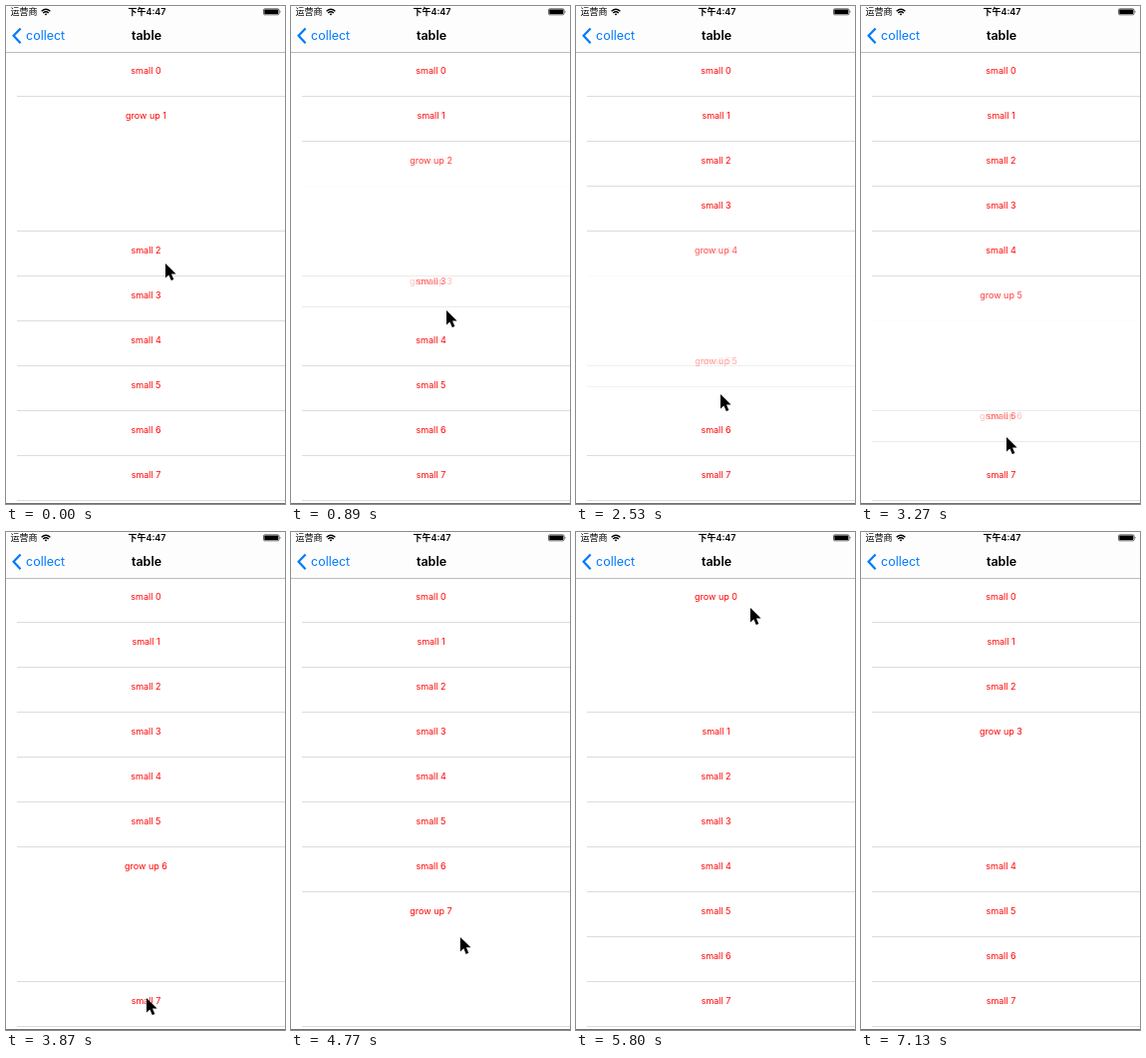
These frames come from a looping animation (280 by 499 pixels, 7570 ms). An HTML page:

```html
<!DOCTYPE html>
<html lang="zh">
<head>
<meta charset="utf-8">
<title>table</title>
<style>
  html, body { margin: 0; width: 100%; height: 100%; overflow: hidden; background: #fff; }
  svg { display: block; width: 100%; height: 100%; }
  text { font-family: Inter, "Noto Sans CJK SC", "Noto Sans CJK", sans-serif; }
  .label { font-size: 9px; fill: #f00; text-anchor: middle; }
  .status { font-size: 9px; }
  .bar { font-size: 12.5px; }
  .mid { text-anchor: middle; font-weight: 600; }
</style>
</head>
<body>
<svg viewBox="0 0 280 499" xmlns="http://www.w3.org/2000/svg">
  <rect width="280" height="499" fill="#fff"/>
  <g id="list"></g>
  <g id="nav">
    <rect width="280" height="46" fill="#fdfdfd"/>
    <rect y="46" width="280" height="1" fill="#bdbdbf"/>
    <text class="status" x="4.5" y="9">运营商</text>
    <g fill="none" stroke="#000" stroke-width="1.3">
      <path d="M35.6 5.2Q40 1.2 44.4 5.2"/>
      <path d="M37.2 7Q40 4.5 42.8 7"/>
    </g>
    <path d="M38.6 8L40 9.5L41.4 8Q40 6.8 38.6 8Z"/>
    <text class="status mid" x="141.5" y="9">下午4:47</text>
    <rect x="258.5" y="2.8" width="15.5" height="6" rx="1.2" fill="none" stroke="#000" stroke-width=".6"/>
    <rect x="259.3" y="3.6" width="13.9" height="4.4" rx=".6"/>
    <path d="M274.8 4.6Q276.2 5.8 274.8 7Z"/>
    <path d="M14.6 22.4L7.6 29.8L14.6 37.2" fill="none" stroke="#007aff" stroke-width="2.2"/>
    <text class="bar" x="20" y="34" fill="#007aff">collect</text>
    <text class="bar mid" x="141" y="34">table</text>
  </g>
  <rect y="498" width="280" height="1" fill="#707070"/>
  <path id="cursor" d="M0 0V14.6L3.4 11.4L5.8 17L8.4 15.9L6 10.4H10.6Z" fill="#000" stroke="#fff" stroke-width="1" paint-order="stroke"/>
</svg>
<script>
const NS = 'http://www.w3.org/2000/svg';
const LOOP = 7570, STEP = 148.6, LEAD = 9;
const ROWS = 8, TOP = 46, SMALL = 45, TALL = 135, FADE = 2;

const taps = [[-9, 1], [0.5, 2], [5.5, 3], [11.5, 4], [16.32, 5],
              [21.5, 6], [27.5, 7], [36.88, 0], [43.5, 3]];
const moves = [ // start, end, x, y, sideways bow
  [2, 4, 156, 305, 0], [8, 10, 148, 338, 0], [13, 15, 145, 389, 0],
  [19, 21.9, 146, 432, 0], [24, 26, 141, 467, 0], [31, 35, 175, 76, 50],
  [39, 42, 168, 292, 0], [45, 48, 172, 515, 0]];

const list = document.getElementById('list');
const cursor = document.getElementById('cursor');
const clamp = v => Math.min(1, Math.max(0, v));
const ease = v => v * v * (3 - 2 * v);
const mix = (a, b, p) => a + (b - a) * p;

function add(parent, tag, attrs) {
  const el = document.createElementNS(NS, tag);
  for (const key in attrs) el.setAttribute(key, attrs[key]);
  if (parent) parent.append(el);
  return el;
}

function makeCell(name, i, height) {
  const cell = add(null, 'g', {});
  add(cell, 'rect', { width: 280, height, fill: '#fff' });
  add(cell, 'text', { class: 'label', x: 140.5, y: 22.2 }).textContent = name + ' ' + i;
  add(cell, 'rect', { x: 11, y: height - 1, width: 269, height: 1, fill: '#dcdcde' });
  return cell;
}

const rows = [...Array(ROWS).keys()];
const small = rows.map(i => makeCell('small', i, SMALL));
const tall = rows.map(i => makeCell('grow up', i, TALL));

const rowTop = (i, open) => TOP + SMALL * i + (i > open ? TALL - SMALL : 0);

function drawList(k) {
  const n = taps.filter(tap => tap[0] <= k).length - 1;
  const [start, open] = taps[n];
  const prev = n ? taps[n - 1][1] : 0;
  const u = clamp((k - start) / FADE), p = ease(u);
  const place = (cell, i, alpha) => {
    cell.setAttribute('transform', `translate(0 ${mix(rowTop(i, prev), rowTop(i, open), p)})`);
    cell.setAttribute('opacity', alpha);
    return cell;
  };
  list.replaceChildren(
    place(small[open], open, 1 - u),
    place(small[prev], prev, u),
    place(tall[prev], prev, 1 - u),
    place(tall[open], open, u),
    ...rows.filter(i => i !== open && i !== prev).map(i => place(small[i], i, 1)));
}

function drawCursor(k) {
  let x = 160, y = 258;
  for (const [start, end, toX, toY, bow] of moves) {
    const p = ease(clamp((k - start) / (end - start)));
    x = mix(x, toX, p) + bow * Math.sin(Math.PI * p);
    y = mix(y, toY, p);
  }
  cursor.setAttribute('transform', `translate(${x} ${y})`);
}

let shown = -1;
function draw(now) {
  const k = Math.floor((now % LOOP + LEAD) / STEP);
  if (k !== shown) {
    shown = k;
    drawList(k);
    drawCursor(k);
  }
}

const begin = performance.now();
function loop() {
  draw(performance.now() - begin);
  requestAnimationFrame(loop);
}
loop();
</script>
</body>
</html>
```
